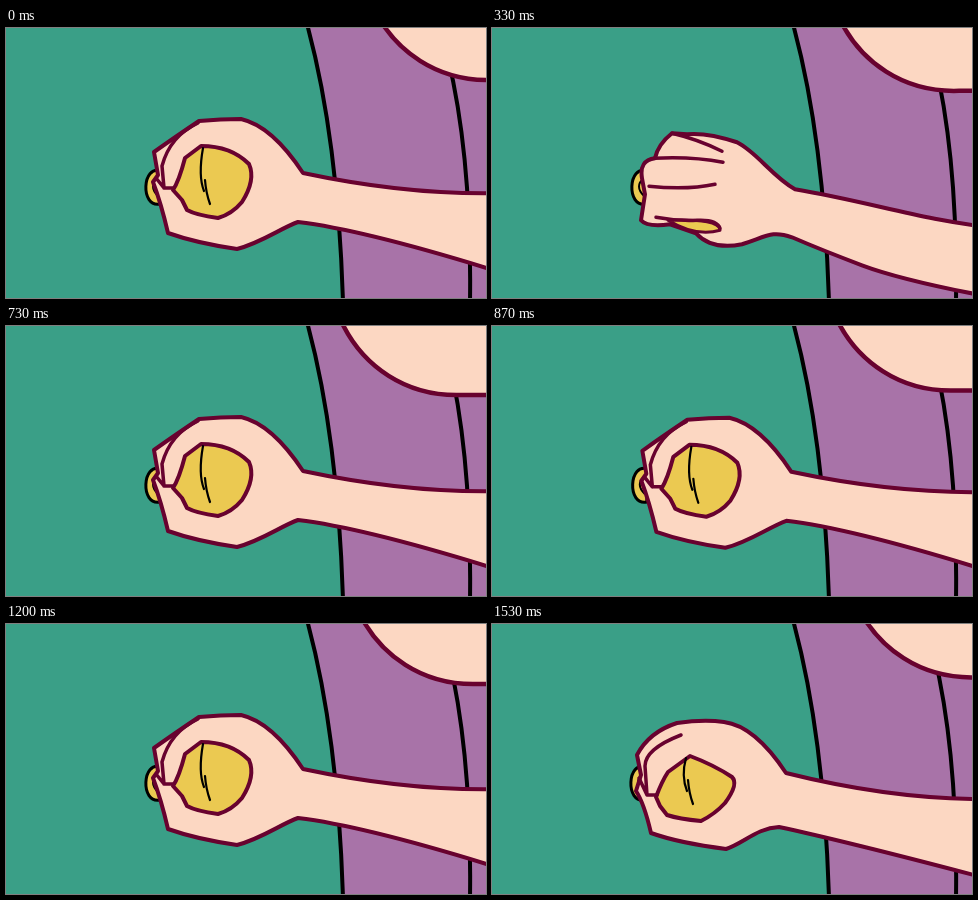
An HTML page with a canvas for the animation above (1590 ms loop, 480x270 px).

```html
<!DOCTYPE html>
<html lang="en">
<head>
<meta charset="utf-8">
<title>Squeezing hand</title>
<style>
html, body { margin: 0; width: 100%; height: 100%; overflow: hidden; background: #3a9f87; }
canvas { display: block; }
</style>
</head>
<body>
<canvas id="stage" width="480" height="270"></canvas>
<script>
const ctx = document.getElementById('stage').getContext('2d');
const LOOP = 1590;
const GREEN = '#3a9f87', PURPLE = '#a873a8', SKIN = '#fcd7c2';
const MAROON = '#68022f', YELLOW = '#ebc951', BLACK = '#000';

// Height of the chin over the loop, as [step, drop].
const CHIN = [[0, 0], [3, 13], [8, 7.5], [11, 17], [15, 8], [18, 8], [24, 0]];

// One smooth rise and fall between two steps, zero elsewhere.
const bump = (step, from, to) =>
  step > from && step < to ? Math.sin(Math.PI * (step - from) / (to - from)) : 0;

function chinDrop(step) {
  const i = CHIN.findIndex(([s]) => s > step);
  const [s0, y0] = CHIN[i - 1], [s1, y1] = CHIN[i];
  return y0 + (y1 - y0) * (step - s0) / (s1 - s0);
}

function paint(d, fill, stroke, width) {
  const path = new Path2D(d);
  if (fill) { ctx.fillStyle = fill; ctx.fill(path); }
  if (stroke) { ctx.strokeStyle = stroke; ctx.lineWidth = width; ctx.stroke(path); }
}

function shifted(x, y, drawPart) {
  ctx.save();
  ctx.translate(x, y);
  drawPart();
  ctx.restore();
}

function drawBody() {
  ctx.fillStyle = GREEN;
  ctx.fillRect(0, 0, 480, 270);
  paint('M301 -4Q332 110 337 274H490V-4Z', PURPLE);
  paint('M301 -4Q332 110 337 274M442 30Q466 130 464 274', null, BLACK, 4);
}

function drawChin() {
  paint('M355 -45L364 -17C384 22 425 54 482 52H560V-45Z', SKIN, MAROON, 4.5);
}

function drawRing() {
  paint('M155 143C136 136 134 180 154 176Z', YELLOW, BLACK, 3);
  paint('M152 150Q142 158 152 168', null, BLACK, 2);
}

// The grip tightens from k = 0 to k = 1.
function drawGrip(k) {
  paint(`M500 ${165 + 6 * k}Q405 ${168 + 4 * k} 297 145Q266 98 235 ${91 + 3 * k}
    Q215 91 ${193 - 5 * k} ${93 + 2 * k}Q${172 - 12 * k} ${107 - 3 * k} 148 ${124 + 3 * k}
    L152 147L147 ${154 + 9 * k}Q155 175 162 205Q190 215 ${231 + 6 * k} 221
    C255 215 ${275 - 7 * k} 200 ${292 - 2 * k} ${194 + 5 * k}
    Q360 ${202 + 12 * k} 500 ${246 + 5 * k}`, SKIN, MAROON, 4);
  paint(`M${195 + 6 * k} ${118 + 10 * k}Q225 ${118 + 19 * k} 243 ${136 + 13 * k}
    Q250 ${152 + 4 * k} 236 ${174 + k}Q226 186 212 ${190 + 3 * k}
    Q190 ${187 + 4 * k} ${181 - 3 * k} ${182 + 5 * k}L${176 - 5 * k} ${172 + 6 * k}
    L167 ${162 + 7 * k}Q173 153 179 ${130 + 14 * k}Z`, YELLOW, MAROON, 4);
  paint(`M192 ${95 + 12 * k}Q${164 - 8 * k} ${108 + 13 * k} 156 138L158 ${160 + 7 * k}H168
    M150 150L158 ${160 + 7 * k}`, null, MAROON, 3.5);
  paint(`M197 ${120 + 10 * k}Q192 148 198 163M199 152Q200 165 204 176`, null, BLACK, 2.2);
}

function drawFist() {
  paint(`M500 197C430 190 380 172 303 159C280 146 265 122 245 112Q215 102 195 104L180 103
    Q166 114 163 128Q147 130 150 148L153 164L149 190Q155 197 178 194L204 203
    Q220 220 250 214C275 206 280 200 300 207Q330 220 370 235T500 267`, SKIN, MAROON, 4);
  paint('M176 190Q228 188 228 200Q204 207 176 190Z', YELLOW, MAROON, 3);
  paint(`M180 103Q206 109 230 121M162 128Q200 126 231 132M157 156Q195 160 223 154
    M164 187Q185 191 205 190T228 198`, null, MAROON, 3.5);
}

function draw() {
  const t = performance.now() % LOOP, beat = t % 200;
  // Steps last 70, 60 and 70 ms in turn.
  const step = 3 * Math.floor(t / 200) + (beat >= 70) + (beat >= 130);
  const second = bump(step, 18, 24);
  const squeeze = bump(step, 1, 11) + second;
  const grip = Math.min(1, 2 * squeeze);
  const lean = Math.min(1, 2 * second);
  const sway = bump(step, 11, 18);
  const sag = 15 * Math.max(0, squeeze - 0.8);
  const drop = chinDrop(step);

  ctx.lineCap = ctx.lineJoin = 'round';
  drawBody();
  shifted(5 - 1.85 * drop, drop, drawChin);
  shifted(sway - lean, 0, drawRing);
  shifted(3 * (sway - lean), sway + 4 * lean + sag,
    () => squeeze > 0.7 ? drawFist() : drawGrip(grip));
  requestAnimationFrame(draw);
}
draw();
</script>
</body>
</html>
```
